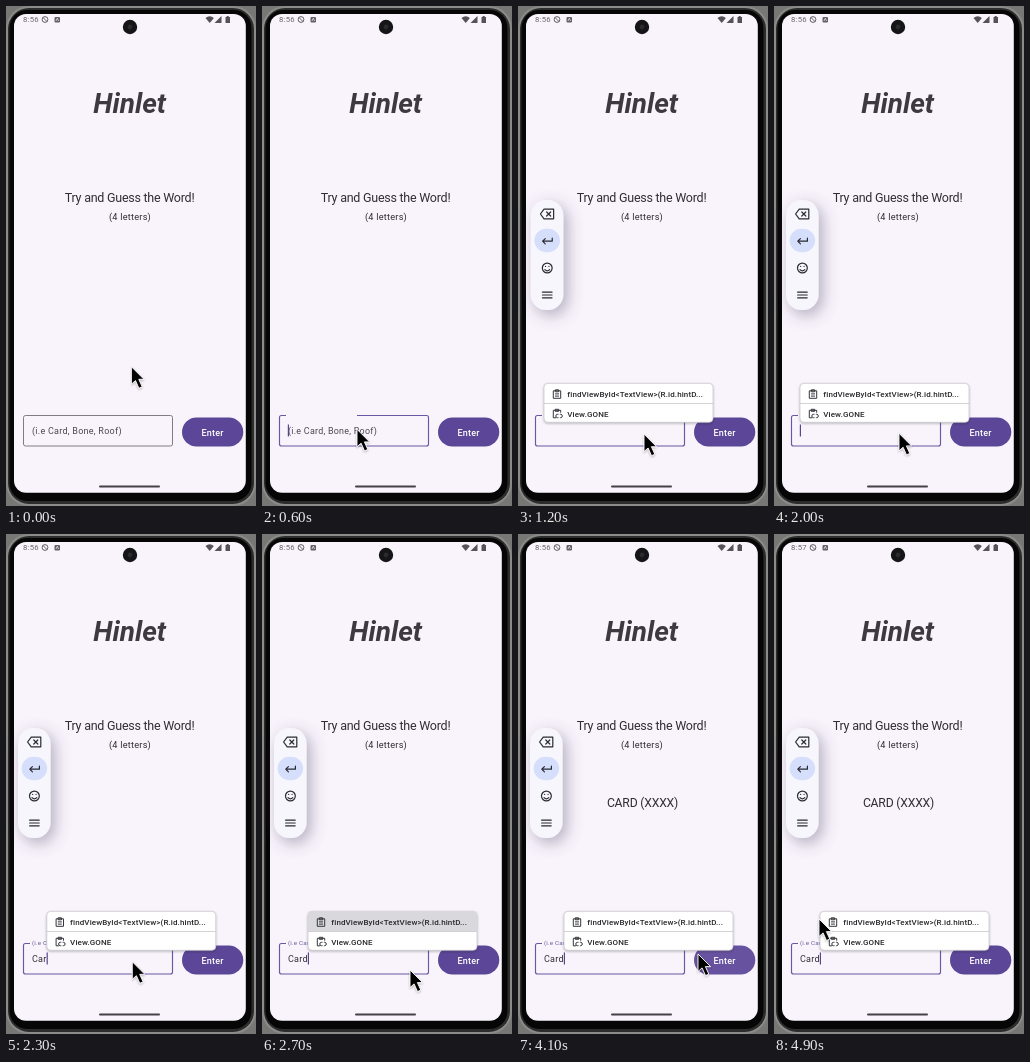
Recreate the animation shown at these times as an HTML page. Size 250x500 px, loop 5 s.

```html
<!DOCTYPE html>
<html lang="en">
<head>
<meta charset="utf-8">
<title>Word guessing app</title>
<style>
html, body { margin: 0; width: 100%; height: 100%; overflow: hidden; background: #777775; }
svg { display: block; width: 250px; height: 500px; }
text { font-family: Roboto, sans-serif; fill: #302d34; white-space: pre; }
.mid { text-anchor: middle; }
.field { font-size: 9px; letter-spacing: .26px; }
.item { font-size: 8px; font-weight: 500; letter-spacing: .1px; fill: #28282c; }
.icon { fill: none; stroke: #292b31; stroke-width: 1.2; stroke-linejoin: round; stroke-linecap: round; }
.clip { fill: none; stroke: #35363b; stroke-width: 1; }
</style>
</head>
<body>
<svg viewBox="0 0 250 500">
  <defs>
    <filter id="soft" x="-120%" y="-40%" width="340%" height="180%">
      <feDropShadow dx="4" dy="5" stdDeviation="8" flood-color="#4b4566" flood-opacity=".42"/>
    </filter>
    <filter id="low" x="-10%" y="-20%" width="120%" height="150%">
      <feDropShadow dx="0" dy="1" stdDeviation="1.3" flood-color="#222" flood-opacity=".3"/>
    </filter>
    <clipPath id="pill"><rect x="176" y="411.6" width="61.3" height="29" rx="14.5"/></clipPath>
    <clipPath id="card"><rect width="169" height="39" rx="4"/></clipPath>
  </defs>

  <!-- phone -->
  <rect width="250" height="500" fill="#777775"/>
  <rect x="1" y="1" width="248" height="498" rx="22" fill="#2c2c2c" stroke="#8b8b89" stroke-width="2"/>
  <rect x="3.5" y="4" width="242" height="491" rx="18" fill="#060607"/>
  <rect x="8" y="8" width="231.8" height="478.8" rx="12" fill="#f9f4fc"/>
  <circle cx="124" cy="21" r="7.2" fill="#151518"/>
  <circle cx="124" cy="21" r="2.4" fill="#29292f"/>
  <rect x="93" y="479.6" width="61" height="1.9" rx=".95" fill="#444148"/>

  <!-- status bar -->
  <text id="clock" x="17" y="16.3" font-size="7.7" letter-spacing=".25" style="fill:#66636b"></text>
  <g fill="none" stroke="#625f67">
    <circle cx="39" cy="13.5" r="2.9"/>
    <path d="M37 11.5l4 4"/>
  </g>
  <rect x="48.5" y="11" width="5.5" height="5.5" rx="1" fill="#625f67"/>
  <path d="M50 15l1.3-2.8 1.3 2.8" fill="none" stroke="#f9f4fc" stroke-width=".7"/>
  <path d="M199.5 12q4.2-3.4 8.4 0l-4.2 5z M208.5 17l7-7v7z" fill="#55525a"/>
  <path d="M219.5 11h1.2v-1h2v1h1.3v6h-4.5z" fill="#55525a"/>

  <!-- page -->
  <text class="mid" x="123.7" y="106.5" font-size="28" font-weight="700" font-style="italic" style="fill:#3c3940">Hinlet</text>
  <text class="mid" x="123.6" y="195.6" font-size="12.5" letter-spacing="-.25">Try and Guess the Word!</text>
  <text class="mid" x="124" y="214" font-size="9.2" letter-spacing=".22">(4 letters)</text>
  <text class="mid" id="result" x="124.5" y="273" font-size="12.2" letter-spacing="-.2">CARD (XXXX)</text>

  <!-- input -->
  <path id="border" fill="none"/>
  <text id="hint" class="field">(i.e Card, Bone, Roof)</text>
  <text id="typed" class="field" x="26" y="428"></text>
  <path id="caret" stroke="#57478f" stroke-width="1.2"/>

  <g clip-path="url(#pill)">
    <rect id="button" x="176" y="411" width="62" height="30"/>
    <circle id="ripple" cx="198" cy="428" fill="#fff"/>
  </g>
  <text class="mid" x="206.6" y="429.6" font-size="9" font-weight="500" letter-spacing=".25" style="fill:#fff">Enter</text>

  <!-- floating keyboard bar -->
  <g id="bar">
    <rect y="194" width="32.5" height="110" rx="15.5" fill="#f7f6fd" filter="url(#soft)"/>
    <rect x="3.6" y="222.8" width="25.5" height="23.4" rx="11.7" fill="#d5defb"/>
    <g class="icon">
      <path d="M9.6 208l3.6-4.8h9.6v9.6h-9.6z M15.8 206l4 4m0-4l-4 4"/>
      <path d="M21.4 232.2v3h-9.6m2.6-2.6l-2.6 2.6 2.6 2.6"/>
      <circle cx="16.4" cy="262" r="4.9"/>
      <path d="M14 263.6q2.4 2.4 4.8 0 M14.7 260.3v.1m3.4-.1v.1"/>
      <path d="M11.6 286.2h9.6m-9.6 2.8h9.6m-9.6 2.8h9.6"/>
    </g>
  </g>

  <!-- paste suggestions -->
  <g id="menu">
    <rect width="169" height="39" rx="4" fill="#fff" stroke="#c2c0c6" stroke-width=".7" filter="url(#low)"/>
    <g clip-path="url(#card)">
      <rect id="hot" width="169" height="20" fill="#d9d8dc"/>
      <path d="M0 20.2h169" stroke="#c9c7cd" stroke-width=".8"/>
    </g>
    <path class="clip" d="M9.3 7.5h7.4v7.5h-7.4z M11.3 6.5h3.4v2h-3.4z M11 10.6h4m-4 2.2h4"/>
    <path class="clip" d="M12 34.5h-2.7v-7.5h7.4v2.4 M11.3 26h3.4v2h-3.4z M14.5 31h-1a1.7 1.7 0 0 0 0 3.4h1m1.4-3.4h.7a1.7 1.7 0 0 1 0 3.4h-.7"/>
    <text class="item" x="23.3" y="13.5">findViewById&lt;TextView&gt;(R.id.hintD...</text>
    <text class="item" x="23.3" y="33.4">View.GONE</text>
  </g>

  <g id="pointer">
    <path d="M0 0V17.5L4.1 13.9 7.5 21.6 10.8 20.1 7.4 12.6H12.6Z" fill="#050505" stroke="#fff" stroke-width=".9" stroke-linejoin="round" filter="url(#low)"/>
  </g>
</svg>
<script>
const LOOP = 5000, STEP = 100;
const $ = id => document.getElementById(id);
const set = (id, attrs) => {
  for (const k in attrs) $(id).setAttribute(k, attrs[k]);
};
const show = (id, on) => set(id, { visibility: on ? 'visible' : 'hidden' });
const clamp = v => Math.max(0, Math.min(1, v));
const ease = p => p * p * (3 - 2 * p);
const mix = (a, b, p) => a + (b - a) * p;
const phase = (t, start, length) => ease(clamp((t - start) / length));
const within = (t, a, b) => t >= a && t < b;

// time, x, y of the pointer tip
const route = [
  [0, 125.4, 360.7], [100, 124.5, 363], [500, 95, 423.3], [700, 95, 423.3],
  [1100, 126, 428], [1600, 126, 429], [2000, 125, 427.3], [2500, 127, 428],
  [2700, 148, 436], [3200, 184, 449], [3500, 198, 428], [3900, 196, 427],
  [4100, 180, 420], [4500, 162, 403], [4700, 104, 347], [4900, 45, 385]
];
const keyTimes = [2100, 2200, 2300, 2400];
const textEnds = [26, 32, 37.3, 40.8, 46];
const caretOff = [[1050, 1550], [2050, 2100], [3000, 3500], [4300, 4800]];

function pointerAt(t) {
  let i = 1;
  while (i < route.length - 1 && route[i][0] < t) i++;
  const [t0, x0, y0] = route[i - 1], [t1, x1, y1] = route[i];
  const p = ease(clamp((t - t0) / (t1 - t0)));
  return [mix(x0, x1, p), mix(y0, y1, p)];
}

// rounded outline that starts and ends on its top edge
const outline = (from, to) => `M${from} 409.5H19.5Q17.5 409.5 17.5 411.5V438Q17.5 440 19.5 440` +
  `H164.5Q166.5 440 166.5 438V411.5Q166.5 409.5 164.5 409.5H${to}`;

function drawField(t) {
  const focus = t >= 500;
  const rise = phase(t, 580, 220);
  const count = keyTimes.filter(k => t >= k).length;
  const end = textEnds[count];
  set('border', {
    d: focus ? outline(24, 95) : outline(24, 24),
    stroke: focus ? '#6858a3' : '#817b86',
    'stroke-width': focus ? 1.15 : 1
  });
  set('hint', { transform: `translate(26 ${mix(428, 411.3, rise)}) scale(${mix(1, .69, rise)})` });
  $('hint').style.fill = rise > .5 ? '#65579a' : '#4b4750';
  $('typed').textContent = 'Card'.slice(0, count);
  set('caret', { d: `M${end + .4} 418.5V430.5` });
  show('caret', focus && !caretOff.some(([a, b]) => within(t, a, b)));
  return end;
}

function draw(t) {
  $('clock').textContent = t < 4300 ? '8:56' : '8:57';
  show('result', t >= 3600);
  const end = drawField(t);

  const over = within(t, 3300, 4300);
  set('button', { fill: over ? '#67529f' : '#5b4697' });
  set('ripple', {
    r: mix(4, 44, phase(t, 3450, 350)),
    opacity: t < 3450 ? 0 : .16 * (1 - phase(t, 3700, 400))
  });

  const slide = phase(t, 800, 500);
  set('bar', { transform: `translate(${mix(20, 12, slide)} 0)`, opacity: phase(t, 750, 300) });
  set('menu', { transform: `translate(${end} 377.3)`, opacity: phase(t, 850, 200) });
  show('hot', within(t, 2700, 3000));

  const [x, y] = pointerAt(t);
  set('pointer', { transform: `translate(${x} ${y})` });
}

function tick() {
  const t = performance.now() % LOOP;
  draw(Math.floor(t / STEP) * STEP);
  requestAnimationFrame(tick);
}
tick();
</script>
</body>
</html>
```
